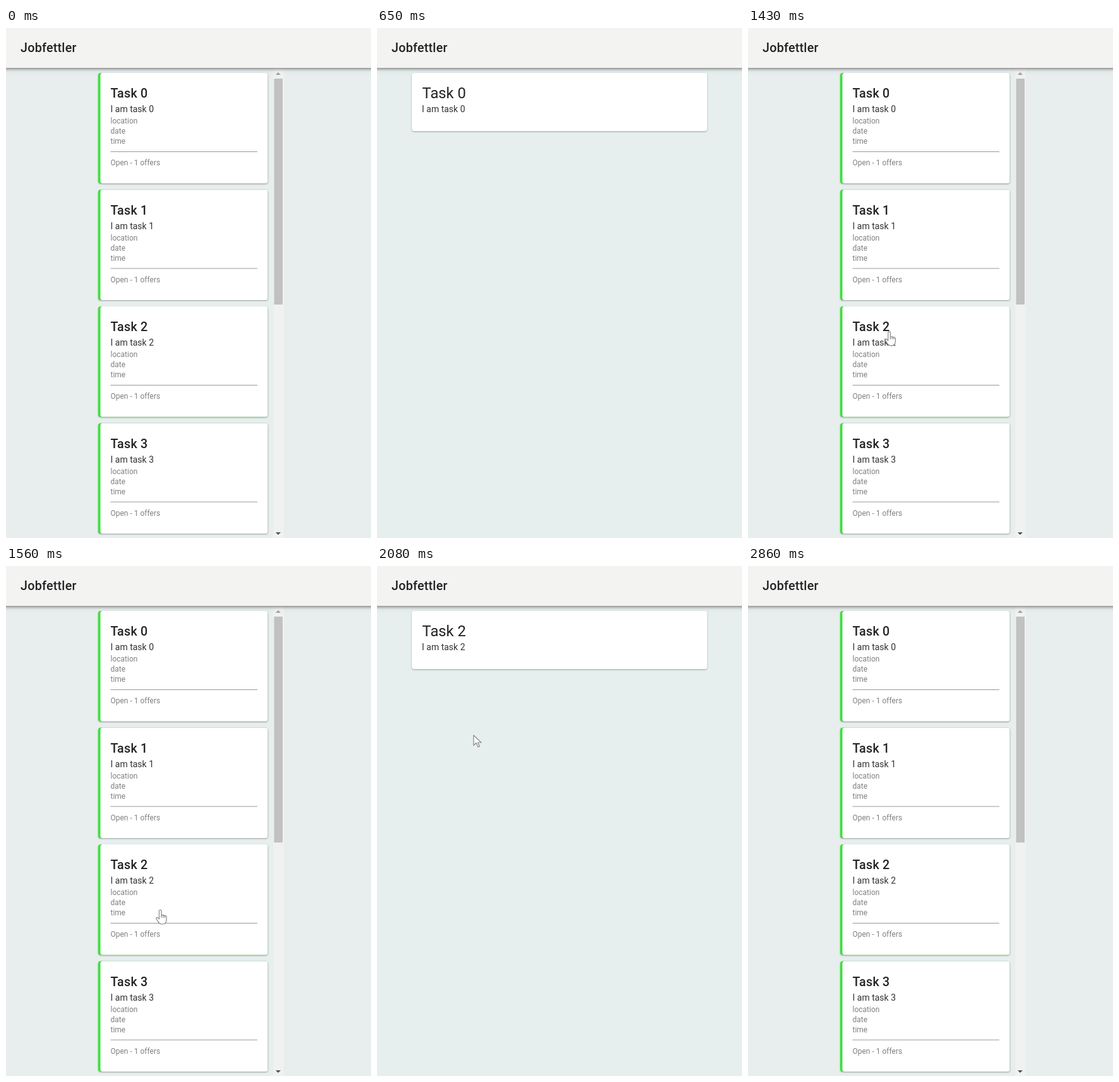
An HTML page for the animation above (3120 ms loop, 578 px wide and 806 px high).

```html
<!DOCTYPE html>
<html lang="en">
<head>
<meta charset="utf-8">
<title>Task list</title>
<style>
html, body { margin: 0; width: 100%; height: 100%; overflow: hidden; background: #e8eeee; }
svg { display: block; width: 578px; height: 806px; font-family: Roboto, sans-serif; }
text { fill: #212325; white-space: pre; }
.brand, .title { font-size: 19.7px; font-weight: 500; letter-spacing: .0125em; }
.heading { font-size: 23.8px; }
.body { font-size: 14px; fill: #333; }
.note { font-size: 12px; fill: #808080; }
.card { filter: drop-shadow(0 1px 1px rgba(0,0,0,.34)); }
.bar { fill: #f3f3f2; filter: drop-shadow(0 2px 2px rgba(0,0,0,.36)) drop-shadow(0 1px 4px rgba(0,0,0,.14)); }
.pointer { fill: #fff; stroke: #85878a; stroke-width: 1.2; stroke-linejoin: round; }
</style>
</head>
<body>
<svg viewBox="0 0 578 806">
  <rect id="page" width="578" height="806"/>
  <g id="list">
    <g id="cards"></g>
    <rect x="423" y="63" width="17" height="743" fill="#f0f1f1"/>
    <rect x="424.5" y="80" width="13.5" height="357" fill="#c1c1c1"/>
    <path d="M427 74l4-4 4 4z" fill="#a0a0a0"/>
    <path d="M427 797l4 4 4-4z" fill="#505050"/>
  </g>
  <g id="detail">
    <rect class="card" x="55" y="71" width="468" height="92" rx="4" fill="#fff"/>
    <text id="heading" class="heading" x="71.5" y="111"></text>
    <text id="summary" class="body" x="71" y="133"></text>
  </g>
  <rect class="bar" x="-20" y="-20" width="618" height="83"/>
  <text class="brand" x="23" y="38">Jobfettler</text>
  <g id="cursor" class="pointer">
    <g id="hand" transform="translate(-9 -12)">
      <path d="M5.5 14V2.5a1.8 1.8 0 0 1 3.6 0V9q1.5-1.4 2.8.4q1.6-1 2.6.5q2.6-.6 2.6 2V16q0 7-6.5 7-5 0-7-4.5L1 14.5q-.6-2.4 1.6-2 1.5.3 2.9 2.5z"/>
      <path d="M9.1 9v4M11.9 9.5v3.5M14.5 10v3" fill="none"/>
    </g>
    <path id="arrow" d="M0 0V16l4-4 3 6.5 2.5-1-3-6h5.5z"/>
  </g>
</svg>
<script>
const $ = id => document.getElementById(id);
const LOOP = 3120, STEP = 130, PITCH = 184.5;
const REST = [246, 555], EXIT = [60, -20];

const label = (kind, y, text) => `<text class="${kind}" x="165.5" y="${y}">${text}</text>`;
const card = n => `<g transform="translate(0 ${n * PITCH})">
  <g class="card">
    <rect x="146" y="71" width="268.5" height="174.5" rx="4" fill="#3be03b"/>
    <rect x="149.5" y="71" width="265" height="174.5" rx="3.5" fill="#fff"/>
  </g>
  ${label('title', 110, 'Task ' + n)}
  ${label('body', 133, 'I am task ' + n)}
  ${['location', 'date', 'time'].map((s, i) => label('note', 151 + 16 * i, s)).join('')}
  <rect x="165.5" y="195" width="232.5" height="1" fill="#999"/>
  ${label('note', 217, 'Open - 1 offers')}
</g>`;
$('cards').innerHTML = [0, 1, 2, 3].map(card).join('');

const show = (id, on) => $(id).style.display = on ? '' : 'none';
const mix = (a, b, p) => a.map((v, i) => v + (b[i] - v) * p);
const easeOut = p => 1 - (1 - p) ** 2;
const easeInOut = p => p * p * (3 - 2 * p);

function cursorAt(t) {
  if (t >= 390 && t < 650) return [230, 150];
  if (t > 1170 && t < 1560) return mix(EXIT, REST, easeOut((t - 1170) / 390));
  if (t >= 1560 && t <= 1820) return REST;
  if (t > 1820 && t < 2340) return mix(REST, EXIT, easeInOut((t - 1820) / 520));
  return null;
}

function draw(t) {
  const task = t >= 520 && t < 1170 ? 0 : t >= 1820 && t < 2860 ? 2 : -1;
  const open = task >= 0;
  show('list', !open);
  show('detail', open);
  $('page').setAttribute('fill', open ? '#e7efee' : '#e8eeee');
  if (open) {
    $('heading').textContent = 'Task ' + task;
    $('summary').textContent = 'I am task ' + task;
  }
  const at = cursorAt(t);
  show('cursor', at);
  if (!at) return;
  const hand = !open || t === 520 || t === 1820;
  show('hand', hand);
  show('arrow', !hand);
  $('cursor').setAttribute('transform', `translate(${at})`);
}

function tick() {
  const t = performance.now() % LOOP;
  draw(Math.floor(t / STEP) * STEP);
  requestAnimationFrame(tick);
}
tick();
</script>
</body>
</html>
```
